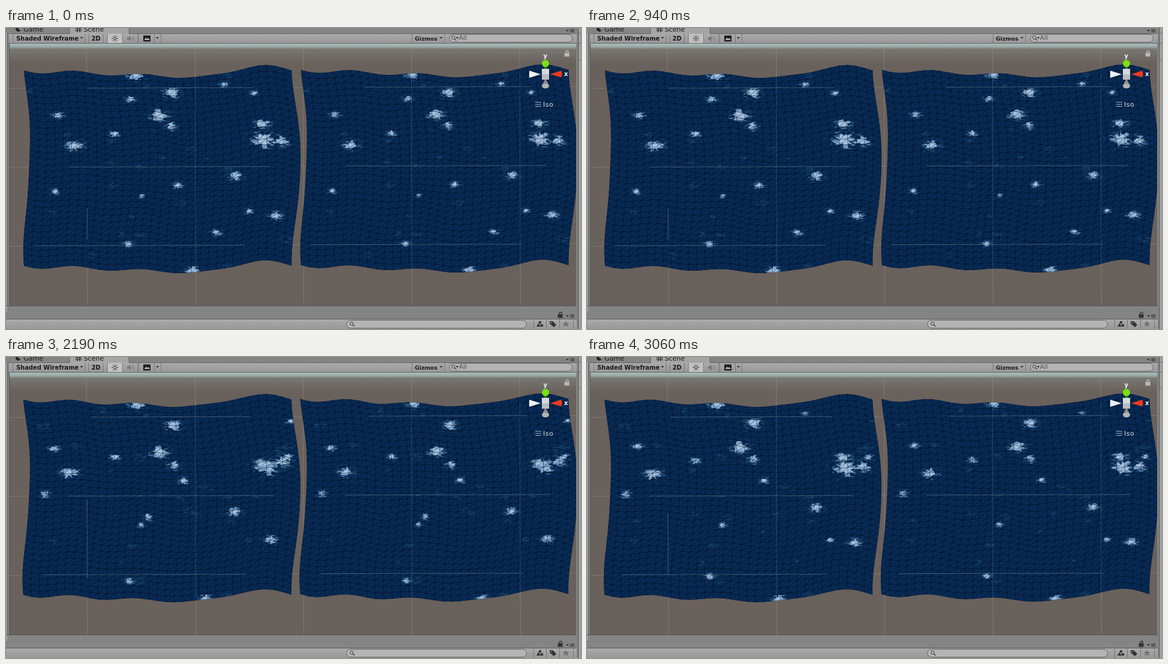
An HTML page with a canvas that plays this animation: 955 px wide and 501 px high, repeating every 3160 ms.

```html
<!DOCTYPE html>
<html lang="en">
<head>
<meta charset="utf-8">
<title>Water mesh</title>
<style>
  html, body { margin: 0; width: 955px; height: 501px; overflow: hidden; background: #848484; }
  svg, canvas { position: absolute; left: 0; top: 0; display: block; }
  text { font: 11px "DejaVu Sans", sans-serif; fill: #1a1a1a; }
  .b { font-weight: bold; font-size: 9.900px; }
  .w { fill: #f4f4f4; }
</style>
</head>
<body>
<svg width="955" height="501" viewBox="0 0 955 501">
  <defs>
    <linearGradient id="sky" x2="0" y2="1">
      <stop offset="0" stop-color="#a9bfbd"/><stop offset=".16" stop-color="#98a9a7"/>
      <stop offset=".3" stop-color="#797672"/><stop offset="1" stop-color="#69615c"/>
    </linearGradient>
    <linearGradient id="bar" x2="0" y2="1">
      <stop offset="0" stop-color="#ababab"/><stop offset="1" stop-color="#989898"/>
    </linearGradient>
    <g id="menu">
      <path d="M-7 2h5l-2.500 3z" fill="#333"/>
      <path d="M0 1.500h7M0 3.500h7M0 5.500h7" stroke="#333"/>
    </g>
    <g id="lock">
      <rect y="4" width="7" height="5"/>
      <path d="M2 4V2q0-2 2-2t2 2v2" fill="none" stroke-width="1.300"/>
    </g>
    <path id="down" d="M0 0h5l-2.500 3z" fill="#333"/>
    <g id="lens" fill="none" stroke="#444"><circle r="2.700"/><path d="M2 2l3 3" stroke-width="1.400"/></g>
  </defs>

  <!-- tabs and toolbar -->
  <path d="M106 9V0h98v9z" fill="#a4a4a4"/>
  <path d="M105.500 0v9M204.500 0v9" stroke="#5d5d5d"/>
  <path d="M16 0a4.500 5 0 0 0 8 4l-4-3 1-1z" fill="#222"/>
  <text x="29" y="6">Game</text>
  <path d="M118.500 0v7M122.500 0v7M115 1.500h11M115 4.500h11" stroke="#222"/>
  <text x="129" y="6">Scene</text>
  <use href="#menu" x="937" y="1"/>
  <rect x="5" y="9" width="943" height="16" fill="url(#bar)"/>
  <path d="M5 9.500h101M204 9.500h744M5 25.500h943" stroke="#656565"/>
  <rect x="169" y="10" width="24" height="15" fill="#c3c3c3"/>
  <path d="M11.500 10v15M131.500 10v15M137.500 10v15M161.500 10v15M168.500 10v15M193.500 10v15M218.500 10v15M220.500 10v15M246.500 10v15M257.500 10v15M674.500 10v15M728.500 10v15" stroke="#7b7b7b"/>
  <text class="b" x="17" y="21">Shaded Wireframe</text>
  <use href="#down" x="123" y="15"/>
  <text class="b" x="142" y="21">2D</text>
  <circle cx="181" cy="17.500" r="2.200" fill="none" stroke="#222"/>
  <path d="M181 12v2M181 21v2M175.500 17.500h2M184.500 17.500h2M177 13.500l1.500 1.500M183.500 20l1.500 1.500M177 21.500l1.500-1.500M183.500 15l1.500-1.500" stroke="#222"/>
  <path d="M201 15.500h3l3-3v10l-3-3h-3z" fill="#777"/>
  <path d="M209 14.500q2 3 0 6M211.500 13q3 4.500 0 9" fill="none" stroke="#777"/>
  <path d="M228 12.500h12v10h-12z" fill="#1c1c1c"/>
  <path d="M229.500 20l3-4 2 2 2-1.500 2.500 3.500z" fill="#b5b5b5"/>
  <use href="#down" x="249" y="15"/>
  <text class="b" x="679" y="21" style="font-size:9.200px">Gizmos</text>
  <use href="#down" x="720" y="15"/>
  <rect x="736.500" y="10.500" width="204" height="13" rx="6.500" fill="#b4b4b4" stroke="#666"/>
  <use href="#lens" x="743" y="16"/>
  <use href="#down" x="747" y="15"/>
  <text x="752" y="20" style="fill:#555">All</text>

  <!-- scene backdrop -->
  <rect x="6" y="26" width="941" height="437" fill="#69615c"/>
  <rect x="6" y="26" width="941" height="32" fill="url(#sky)"/>
  <path d="M133.500 30L135.500 462M314.500 30L315.500 462M493.500 30L494.500 462M673.500 30L674.500 462M853 30L854.500 462M6 100.500L947 97.500M6 232L947 228M6 363.500L947 359" fill="none" stroke="#a39d97" stroke-opacity=".38"/>

  <!-- side and bottom panels -->
  <rect width="2" height="463" y="9" fill="#a2a2a2"/>
  <path d="M2.500 9v454M5.500 25v438M950.500 0v501" stroke="#555"/>
  <path d="M0 462.500h948" stroke="#555"/>
  <rect x="951" width="4" height="501" fill="#9f9f9f"/>
  <path d="M951 8.500h4M951 25.500h4M951 52.500h4" stroke="#707070"/>
  <rect y="484" width="948" height="17" fill="url(#bar)"/>
  <path d="M0 484.500h948" stroke="#5c5c5c"/>
  <rect x="565.500" y="486.500" width="299" height="13" rx="6.500" fill="#b4b4b4" stroke="#666"/>
  <use href="#lens" x="574" y="492"/>
  <path d="M876.500 485v16M897.500 485v16M919.500 485v16M942.500 485v16" stroke="#757575"/>
  <path d="M881 497l3.500-6 3.500 6z" fill="#333"/><circle cx="887" cy="490" r="2.200" fill="#333"/><path d="M888 493h4v4h-4z" fill="#333"/>
  <path d="M903 488h5l6 6-4 4-7-6z" fill="#333"/><circle cx="905.500" cy="490.500" r="1" fill="#aaa"/>
  <path d="M930 487l1.600 4h4.200l-3.300 2.600 1.200 4.200-3.700-2.500-3.700 2.500 1.200-4.200-3.300-2.600h4.200z" fill="#717171"/>
  <use href="#lock" x="917" y="473" fill="#333" stroke="#333"/>
  <use href="#menu" x="937" y="476"/>
</svg>

<canvas id="water" width="955" height="501"></canvas>

<svg width="955" height="501" viewBox="0 0 955 501">
  <use href="#lock" x="928" y="38" fill="#bdbab7" stroke="#bdbab7"/>
  <text class="b w" x="892.500" y="50">y</text>
  <text class="b w" x="927" y="80">x</text>
  <path d="M893 64h6l-1 5h-4z" fill="#2c7210"/>
  <circle cx="896" cy="59" r="6" fill="#79e012"/>
  <path d="M888 77L869 71v12z" fill="#eef0f2"/>
  <path d="M904 77l18-6q3 5.500 0 11z" fill="#ee3a1b"/>
  <path d="M896 84l-6 12q6 9 12 0z" fill="#8e8e8e"/>
  <ellipse cx="896" cy="96.500" rx="6" ry="4" fill="#b2b2b2"/>
  <rect x="890" y="68" width="12" height="18" fill="#b9bcc0"/>
  <rect x="890" y="68" width="12" height="9" fill="#d7dadd"/>
  <path d="M879 123.500h10M879 127h10M879 130.500h10" stroke="#a9b2bd"/>
  <text x="892" y="131" style="fill:#d5d9de;letter-spacing:.5px">Iso</text>
</svg>

<script>
const ctx = document.getElementById('water').getContext('2d');
const LOOP = 3160, WAVE = 943, N = 32, TAU = Math.PI * 2;
const { sin, cos, sign, abs, max } = Math;
const steps = [0, 150, 300, 420, 550, 700, 820, 940, 1090, 1240, 1390, 1510, 1660,
  1810, 1930, 2050, 2190, 2310, 2440, 2560, 2680, 2820, 2940, 3060];

// Large foam patches: crest position, trough position, radius
const patches = [
  [427, 186, 442, 178, 20], [457, 188, 460, 157, 13], [425, 159, 424, 200, 12],
  [254, 145, 257, 175, 15], [275, 108, 281, 122, 13], [275, 163, 286, 202, 10],
  [113, 196, 95, 188, 16], [86, 145, 72, 162, 9], [180, 176, 182, 154, 8],
  [215, 77, 222, 78, 14], [381, 246, 377, 272, 11], [448, 312, 428, 293, 12],
  [203, 360, 207, 390, 8], [310, 404, 360, 402, 13]];

function random(seed) {
  return () => {
    seed = seed + 0x6D2B79F5 | 0;
    let n = Math.imul(seed ^ seed >>> 15, 1 | seed);
    n = n + Math.imul(n ^ n >>> 7, 61 | n) ^ n;
    return ((n ^ n >>> 14) >>> 0) / 4294967296;
  };
}

const rnd = random(11);
const flecks = Array.from({ length: 64 }, () => ({
  x: 40 + rnd() * 440, y: 76 + 328 * Math.pow(rnd(), 1.2), size: 4 + rnd() * 5, peak: rnd() * TAU
}));

// Swell along x; the sway carries it sideways
function swell(u, k) {
  const a = TAU * (u + .034 * k * sin(Math.PI * Math.min(1, u * 1.1)));
  return 74.5 + 6.5 * sin(a - 1.4) + 3.7 * sin(2 * a) + 2.4 * sin(3 * a + 1.05) + 2.3 * sin(4 * a + .25);
}

function makeMesh(angle) {
  const k = (1 - cos(angle)) / 2, mesh = [];
  for (let j = 0; j <= N; j++) {
    const v = j / N, a = TAU * v, row = [];
    const x0 = 35 - k + (5.4 + k) * sin(a - .93) + sin(2 * a - .97);
    const x1 = 482.4 - k / 2 + 7.4 * sin(a - 1.36) - .75 * cos(2 * a);
    for (let i = 0; i <= N; i++) {
      const u = i / N, w = sin(Math.PI * u) * sin(Math.PI * v);
      row.push([
        x0 + (x1 - x0) * u + w * 3 * sin(TAU * (2 * u + v) + angle),
        swell(u, k) + 325 * v + w * 3 * sin(TAU * (3 * u - 2 * v) - angle)]);
    }
    mesh.push(row);
  }
  return mesh;
}

function trace(points) {
  points.forEach(([x, y], i) => i ? ctx.lineTo(x, y) : ctx.moveTo(x, y));
}

function outline(mesh) {
  ctx.beginPath();
  trace([...mesh[0], ...mesh.map(r => r[N]), ...mesh[N].slice().reverse(), ...mesh.map(r => r[0]).reverse()]);
  ctx.closePath();
}

function wires(mesh) {
  ctx.beginPath();
  for (let k = 0; k <= N; k++) {
    trace(mesh[k]);
    trace(mesh.map(r => r[k]));
  }
  for (let j = 0; j < N; j++)
    for (let i = 0; i < N; i++) trace([mesh[j + 1][i], mesh[j][i + 1]]);
  ctx.lineWidth = .85;
  ctx.strokeStyle = 'rgba(2,10,22,.62)';
  ctx.stroke();
}

// Thin slivers scattered around the origin
function slivers(r, count, w, h, color) {
  ctx.beginPath();
  for (let i = 0; i < count; i++) {
    const dir = r() * TAU, far = Math.sqrt(r()), x = cos(dir) * far * w, y = sin(dir) * far * h;
    const len = 2 + r() * 5, slope = (r() - .5) * len;
    trace([[x - len, y - slope], [x + len, y + slope], [x + slope * .5, y + 1.8]]);
  }
  ctx.fillStyle = color;
  ctx.fill();
}

// Ragged star-shaped blob
function splash(r, w, h, color) {
  const tips = 22;
  ctx.beginPath();
  trace(Array.from({ length: tips }, (_, i) => {
    const dir = (i + r() * .7) / tips * TAU, far = .4 + r() * .75;
    return [cos(dir) * far * w, sin(dir) * far * h];
  }));
  ctx.fillStyle = color;
  ctx.fill();
}

function foam(seed, x, y, size, bright) {
  const r = random(seed * 97 + 5), w = size * (1 + r() * .25), h = size * (.55 + r() * .25);
  ctx.save();
  ctx.translate(x, y);
  slivers(r, 5 + size * 1.6, w * 1.5, h * 1.6, 'rgba(30,88,126,.5)');
  if (bright) {
    slivers(r, size * 1.3, w * 1.05, h * 1.1, 'rgba(100,148,192,.8)');
    splash(r, w * .85, h * .95, 'rgba(138,173,212,.9)');
    splash(r, w * .6, h * .65, 'rgba(170,199,230,.85)');
  }
  ctx.restore();
}

function allFoam(angle, scale) {
  const k = ((1 - cos(angle)) / 2) ** 2;
  flecks.forEach(({ x, y, size, peak }, i) => {
    const life = cos(angle - peak);
    if (life > 0) foam(i + 50, x, y, size * Math.sqrt(life) * scale, size > 7.2 && life > .4);
  });
  patches.forEach(([x0, y0, x1, y1, size], i) =>
    foam(i, x0 + (x1 - x0) * k, y0 + (y1 - y0) * k, size * scale, true));
}

function guides(angle) {
  const k = (1 - cos(angle)) / 2;
  ctx.beginPath();
  for (const tile of [0, 1]) {
    const level = (x0, x1, y) => trace([[x0 + tile * 460, y - tile * 1.7], [x1 + tile * 460, y - .8 - tile * 1.7]]);
    level(135 + 10 * k, 410 - 6 * k, 100);
    level(105 - 3 * k, 438 + 10 * k, 231.4);
    level(46 + 25 * k, 397 + 4 * k, 362.4);
  }
  trace([[134.5, 300 - 95 * k], [135, 352 + 25 * k]]);
  ctx.lineWidth = 1;
  ctx.strokeStyle = 'rgba(150,165,172,.42)';
  ctx.stroke();
  ctx.beginPath();
  for (const x of [314.5, 673.5, 853.5]) trace([[x, 75], [x + .5, 400]]);
  ctx.strokeStyle = 'rgba(140,160,175,.28)';
  ctx.stroke();
}

function draw(time) {
  const angle = TAU * (time / WAVE - .02), mesh = makeMesh(angle);
  ctx.clearRect(0, 0, 955, 501);
  ctx.save();
  ctx.beginPath();
  ctx.rect(6, 26, 941, 437);
  ctx.clip();
  for (const tile of [0, 1]) {
    ctx.save();
    ctx.translate(tile * 460, -tile);
    outline(mesh);
    ctx.fillStyle = '#082a55';
    ctx.fill();
    ctx.clip();
    allFoam(angle, 1 - tile * .13);
    wires(mesh);
    ctx.restore();
  }
  guides(angle);
  ctx.restore();
}

let shown = -1;
function tick() {
  const now = performance.now() % LOOP, time = steps.filter(s => s <= now).pop();
  if (time !== shown) draw(shown = time);
  requestAnimationFrame(tick);
}
tick();
</script>
</body>
</html>
```
